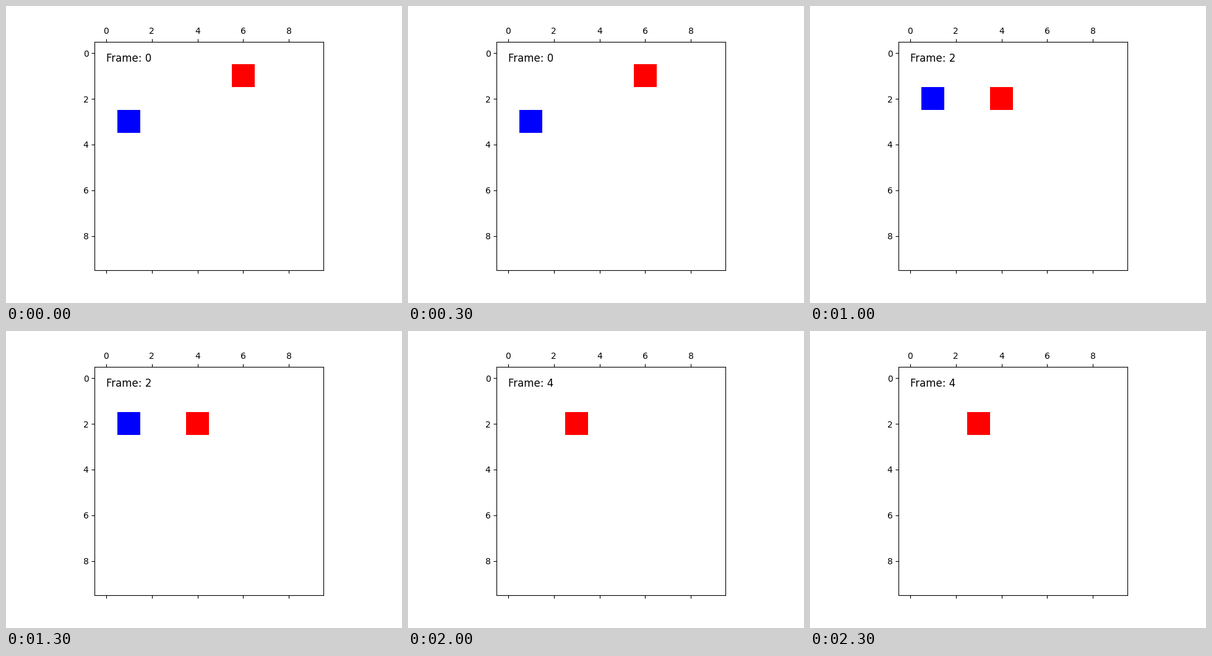
Write a matplotlib script that moves like this. It is 640 by 480 pixels and loops after 2.5 s.

```python
import numpy as np
import matplotlib.pyplot as plt
from matplotlib.animation import FuncAnimation

SIZE = 10
RED, BLUE = (255, 0, 0), (0, 0, 255)

# (column, row) of each walker per step; blue is caught on the last step
RED_PATH = [(6, 1), (5, 2), (4, 2), (4, 3), (3, 2)]
BLUE_PATH = [(1, 3), (0, 3), (1, 2), (2, 2)]


def grid(step):
    cells = np.full((SIZE, SIZE, 3), 255, dtype=np.uint8)
    for path, color in ((BLUE_PATH, BLUE), (RED_PATH, RED)):
        if step < len(path):
            col, row = path[step]
            cells[row, col] = color
    return cells


fig, ax = plt.subplots(figsize=(6.4, 4.8), dpi=100)
image = ax.matshow(grid(0))
label = ax.text(0.05, 0.95, "", transform=ax.transAxes, fontsize=12, va="top")


def update(step):
    image.set_data(grid(step))
    label.set_text(f"Frame: {step}")
    return image, label


anim = FuncAnimation(fig, update, frames=len(RED_PATH), interval=500,
                     repeat=True, repeat_delay=0)
plt.show()
```
